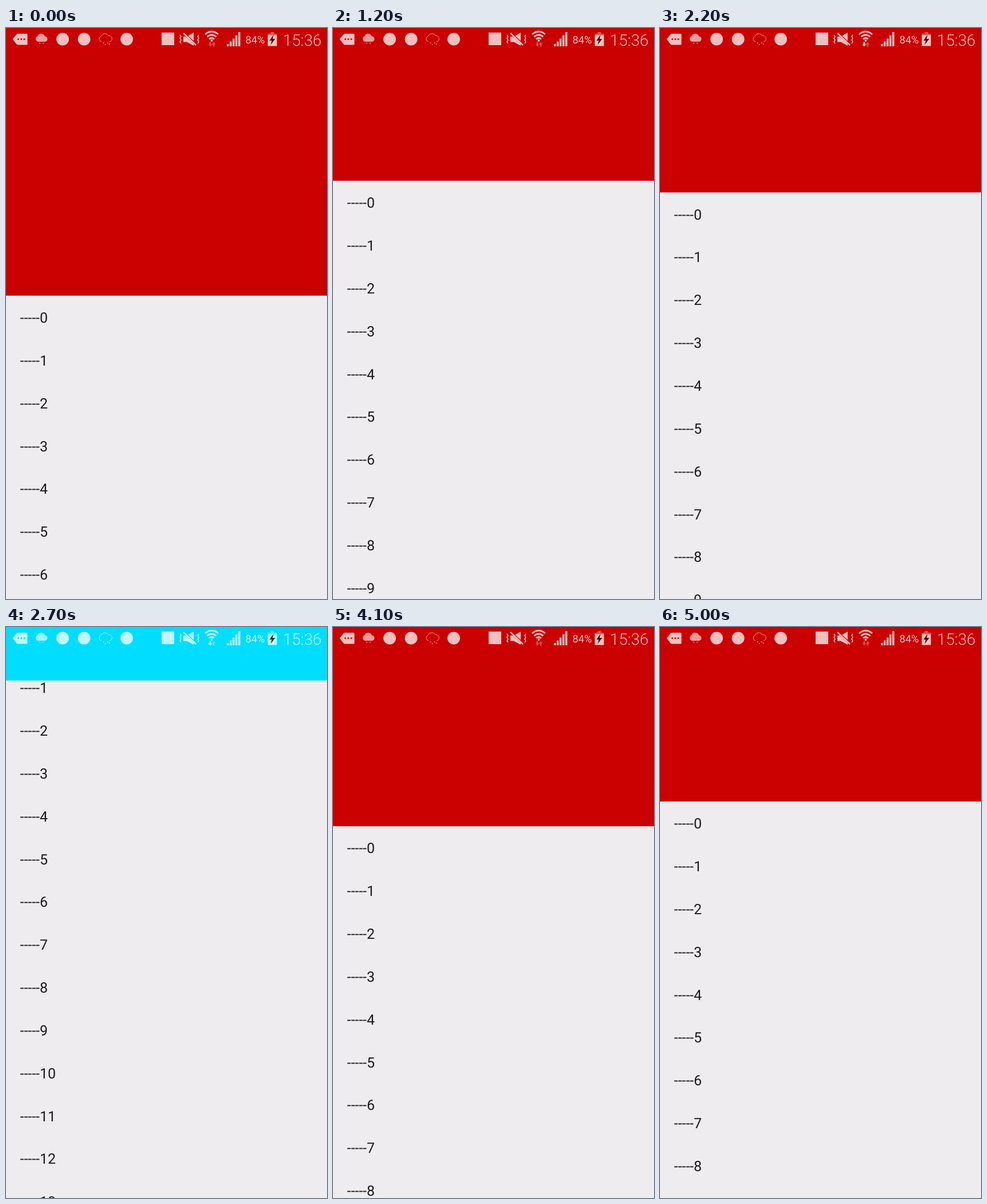
An HTML page for the animation above (5.1 s loop, 561 by 998 pixels).

```html
<!DOCTYPE html>
<html lang="en">
<head>
<meta charset="utf-8">
<title>Collapsing header</title>
<style>
  html, body { margin: 0; width: 100%; height: 100%; overflow: hidden; background: #eeecee; }
  svg { display: block; width: 100%; height: 100%; font-family: Roboto, sans-serif; text-rendering: geometricPrecision; }
  #rows { font-size: 24.93px; fill: #19191c; }
  #header { fill: currentColor; }
  #status { fill: #fff; opacity: .75; }
  .line { fill: none; stroke: #fff; }
  .hole { fill: currentColor; }
</style>
</head>
<body>
<svg id="screen" viewBox="0 0 561 998">
  <g id="rows"></g>
  <rect id="header" width="561" height="468"/>
  <g id="status">
    <!-- message -->
    <path d="M11.500 19.500 18.500 11Q19.500 10 21 10H36Q37.500 10 37.500 11.500V28Q37.500 29.500 36 29.500H21Q19.500 29.500 18.500 28.500Z"/>
    <g class="hole">
      <circle cx="21.500" cy="19.500" r="1.500"/>
      <circle cx="26.800" cy="19.500" r="1.500"/>
      <circle cx="32" cy="19.500" r="1.500"/>
    </g>
    <!-- weather -->
    <g opacity=".82">
      <path d="M56 24A5 5 0 0 1 55 14.500A7 7 0 0 1 68 14.500A4.800 4.800 0 0 1 68.500 24Z"/>
      <circle cx="59" cy="26.500" r="1"/>
      <circle cx="65" cy="26.500" r="1"/>
    </g>
    <g class="line" opacity=".8">
      <path d="M167 24A5 5 0 0 1 166 14.500A7.300 7.300 0 0 1 179 13.500A5.300 5.300 0 0 1 181 24"/>
      <path d="M171 25l-1 2M178 25l-1 2M174 28l-1 2M181 27l-1 2" stroke-width="1.400"/>
    </g>
    <!-- app badges -->
    <circle cx="99" cy="19.500" r="11"/>
    <circle cx="136.500" cy="19.500" r="11"/>
    <circle cx="211" cy="19.500" r="11"/>
    <rect x="272" y="8" width="22" height="22"/>
    <!-- muted, vibrating -->
    <path d="M310 15H316L328 8V31L316 24.500H310Z"/>
    <path class="hole" d="M308 9 311 7 334 28 331 31Z"/>
    <path class="line" d="M310 9 332 30" stroke-width="2.500"/>
    <path class="line" d="M304 12l2 3-2 3 2 3-2 3 2 3M337 12l-2 3 2 3-2 3 2 3-2 3" stroke-width="1.500"/>
    <!-- wifi -->
    <path class="line" d="M348 11Q359.500 1.500 371 11M351.500 15.500Q359.500 8.500 367.500 15.500M355 19.500Q359.500 15.500 364 19.500" stroke-width="2.800"/>
    <circle cx="359.500" cy="22" r="2"/>
    <path id="download" d="M355.500 24.500h3v4h2l-3.500 4-3.500-4h2Z"/>
    <path d="M361.500 32.500h3v-4h2l-3.500-4-3.500 4h2Z" opacity=".4"/>
    <!-- signal -->
    <path d="M386 28h3.500v4H386ZM391 23.500h3.500V32H391ZM396 18.500h3.500V32H396ZM401 13h3.500V32H401ZM406 7h3.500V32H406Z"/>
    <text x="418.500" y="27" font-size="18.300">84%</text>
    <!-- battery -->
    <path d="M462.500 7h6v3h5v3h-16v-3h5Z" opacity=".45"/>
    <rect x="457.500" y="12.500" width="16" height="19"/>
    <path d="M467.500 12 460.500 22H464.500L462.500 29.500 470.500 19H466Z" fill="#200808"/>
    <text x="484" y="31" font-size="27.800" font-weight="350">15:36</text>
  </g>
</svg>
<script>
const LOOP = 5100, STEP = 100;
const EXPANDED = 467.8, COLLAPSED = 93.6, ROW_HEIGHT = 74.85, BASELINE = 47.2;

// [time in ms, header height, list scroll]
const motion = [
  [0, EXPANDED, 0], [300, EXPANDED, 0], [600, COLLAPSED, 0],
  [1100, COLLAPSED, 0], [1200, 267, 0], [1300, 395, 0], [1500, EXPANDED, 0],
  [1900, EXPANDED, 0], [2200, 287.4, 0], [2500, COLLAPSED, 0],
  [2700, COLLAPSED, 100.5], [2800, COLLAPSED, 130], [3100, COLLAPSED, 0],
  [3300, 389, 0], [3400, 440, 0], [3600, EXPANDED, 0],
  [4000, EXPANDED, 0], [4300, 109, 0], [4400, COLLAPSED, 20],
  [4500, COLLAPSED, 35], [4600, COLLAPSED, 0],
  [4700, 155, 0], [4800, 230, 0], [4900, 297, 0], [5000, 305, 0]
];

const byId = id => document.getElementById(id);
const screenBox = byId("screen"), rows = byId("rows"), header = byId("header"), download = byId("download");

for (let i = 0; i < 20; i++) {
  const row = document.createElementNS(rows.namespaceURI, "text");
  row.setAttribute("x", 24.5);
  row.setAttribute("y", BASELINE + i * ROW_HEIGHT);
  row.textContent = "-----" + i;
  rows.append(row);
}

function poseAt(time) {
  const next = motion.findIndex(key => key[0] >= time);
  if (next === 0) return motion[0].slice(1);
  const from = motion[next - 1], to = motion[next];
  const mix = (time - from[0]) / (to[0] - from[0]);
  return [1, 2].map(i => from[i] + (to[i] - from[i]) * mix);
}

function draw(now) {
  const time = Math.floor(now % LOOP / STEP) * STEP;
  const [height, scroll] = poseAt(time);
  header.setAttribute("height", height);
  rows.setAttribute("transform", `translate(0 ${height - scroll})`);
  screenBox.style.color = height <= COLLAPSED ? "#00ddff" : "#cb0000";
  download.setAttribute("opacity", time >= 2100 && time < 3000 ? 1 : .4);
}

const start = performance.now();
function tick() {
  draw(performance.now() - start);
  requestAnimationFrame(tick);
}
tick();
</script>
</body>
</html>
```
